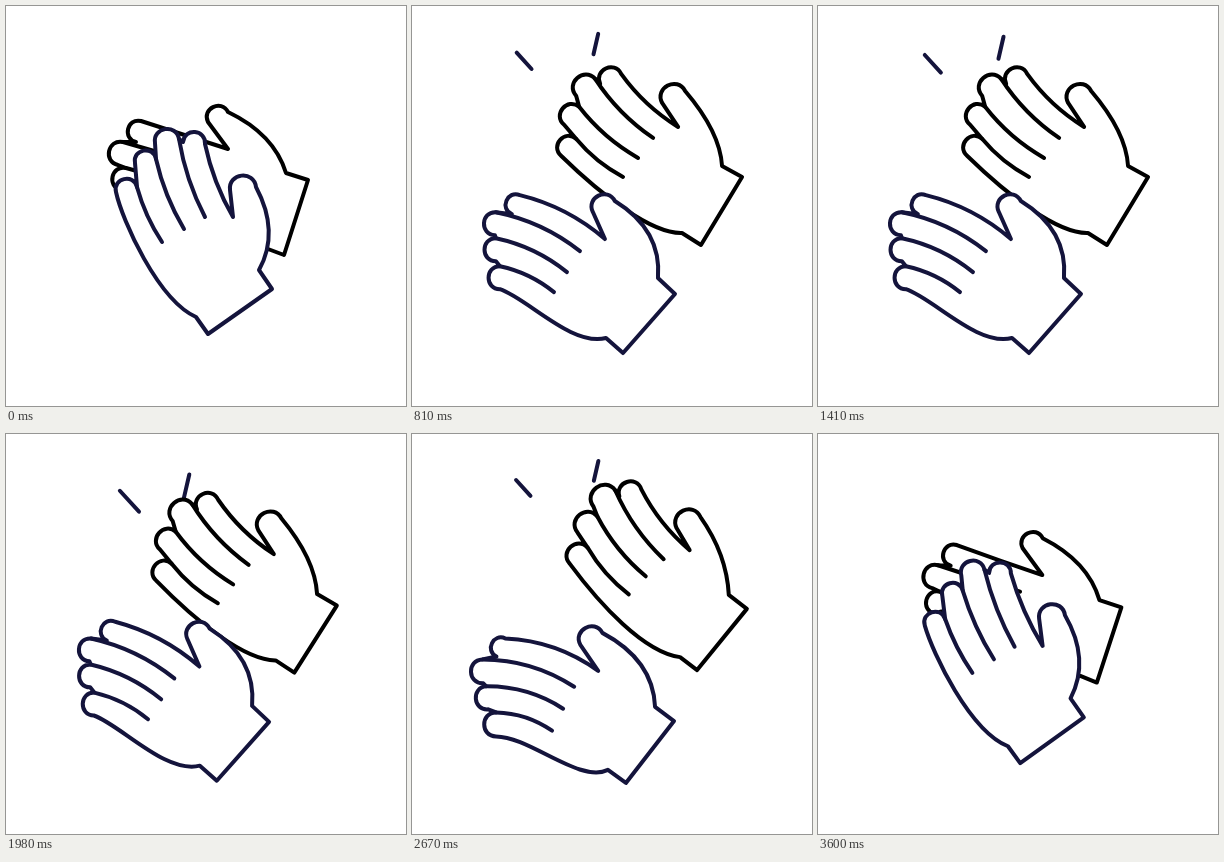
An HTML page with a canvas that plays this animation: 400 px wide and 400 px high, repeating every 3630 ms.

```html
<!DOCTYPE html>
<html lang="en">
<head>
<meta charset="utf-8">
<title>Clapping hands</title>
<style>
html, body { margin: 0; width: 100%; height: 100%; overflow: hidden; background: #fff; }
canvas { display: block; width: 100vmin; height: 100vmin; }
</style>
</head>
<body>
<canvas id="stage" width="400" height="400"></canvas>
<script>
const ctx = document.getElementById('stage').getContext('2d');
const STEP = 30, STEPS = 121;
const NAVY = '#14143c';

// Pose points: pinky, ring and middle as (start, end, crease), index (start, end),
// thumb crotch, thumb (start, end), side control, four wrist corners, heel controls.
const pose = text => text.trim().split(/\s+/).map(p => p.split(',').map(Number));

const back = {
  color: '#000', pivot: [290, 212], bends: [0, -.1, -.1],
  starts: [1, 21, 41, 59.8, 81, 101, 121],
  poses: [
    pose(`122,200 126,181 172,200  115,184 120,162 185,180  112,159 117,136 200,160
      130,136 135,115 222,143  202,116 222,106  268,128
      280,167 302,174 278,249 262,243  230,245 150,215`),
    pose(`149,150 164,133 211,171  152,119 167,101 226,152  164,90 183,73 241,132
      188,78 209,68 266,121  250,97 273,85  308,126
      310,160 330,171 289,239 270,227  240,228 190,190`),
    pose(`158,129 176,113 217,160  166,98 186,82 234,142  182,72 204,56 252,125
      208,62 230,55 278,116  265,94 289,83  315,120
      317,161 335,175 285,236 268,223  232,218 188,170`)
  ]
};

const front = {
  color: NAVY, pivot: [235, 310], bends: [-.08, .12, .15],
  starts: [1, 21, 41, 60.1, 81, 101, 121],
  poses: [
    pose(`110,186 131,181 156,236  129,157 150,153 178,223  149,137 173,133 199,211
      177,136 199,138 227,211  224,184 250,181  274,226
      253,264 266,283 202,328 190,311  152,294 116,214`),
    pose(`88,283 88,260 142,286  84,255 84,232 155,266  83,229 84,206 168,245
      100,208 108,189 193,233  181,206 203,195  250,224
      246,272 263,288 211,347 194,332  160,341 115,292`),
    pose(`84,303 84,279 140,297  76,276 74,253 151,275  71,250 70,226 162,253
      84,223 93,205 186,237  168,211 190,199  241,226
      243,273 262,287 214,349 196,336  168,350 118,303`)
  ]
};

const mix = (a, b, t) => a + (b - a) * t;
const ease = t => (1 - Math.cos(Math.PI * t)) / 2;

// Moves a point along an arc around the pivot.
function swing(a, b, [px, py], t) {
  const ax = a[0] - px, ay = a[1] - py, bx = b[0] - px, by = b[1] - py;
  const turn = Math.atan2(ax * by - ay * bx, ax * bx + ay * by) * t;
  const ra = Math.hypot(ax, ay), scale = mix(ra, Math.hypot(bx, by), t) / ra;
  const c = Math.cos(turn) * scale, s = Math.sin(turn) * scale;
  return [px + ax * c - ay * s, py + ax * s + ay * c];
}

// 0 = palms together, 1 = wide open.
function openness(frame, starts) {
  const i = starts.findLastIndex(s => s <= frame);
  if (i < 0 || i === starts.length - 1) return 0;
  const opening = 8.4, t = frame - starts[i], length = starts[i + 1] - starts[i];
  return t < opening ? ease(t / opening) : ease(((length - t) / (length - opening)) ** .8);
}

function cap(a, b) {
  const dx = (b[1] - a[1]) * .66, dy = (a[0] - b[0]) * .66;
  ctx.lineTo(...a);
  ctx.bezierCurveTo(a[0] + dx, a[1] + dy, b[0] + dx, b[1] + dy, ...b);
}

function bow(a, b, bend) {
  ctx.quadraticCurveTo((a[0] + b[0]) / 2 + (b[1] - a[1]) * bend,
    (a[1] + b[1]) / 2 - (b[0] - a[0]) * bend, ...b);
}

function drawHand(hand, frame) {
  const s = openness(frame, hand.starts), middle = .81;
  const k = s < middle ? 0 : 1;
  const t = k ? (s - middle) / (1 - middle) : s / middle;
  const p = hand.poses[k].map((a, i) => swing(a, hand.poses[k + 1][i], hand.pivot, t));
  const bend = mix(hand.bends[k], hand.bends[k + 1], t);

  ctx.strokeStyle = hand.color;
  ctx.beginPath();
  ctx.moveTo(...p[0]);
  for (const i of [0, 3, 6, 9]) cap(p[i], p[i + 1]);
  bow(p[10], p[11], bend);
  cap(p[12], p[13]);
  ctx.quadraticCurveTo(...p[14], ...p[15]);
  for (const i of [16, 17, 18]) ctx.lineTo(...p[i]);
  ctx.bezierCurveTo(...p[19], ...p[20], ...p[0]);
  ctx.closePath();
  ctx.fill();
  ctx.stroke();

  ctx.beginPath();
  for (const i of [1, 4, 7]) {
    ctx.moveTo(...p[i]);
    bow(p[i], p[i + 1], bend);
  }
  ctx.stroke();
}

// Two dashes shoot outward after each clap and shrink away.
function drawDashes(frame) {
  const u = frame % 20.6;
  if (u < 1.2 || u > 13.6) return;
  const outer = 20 + .608 * Math.max(0, 10 - u) ** 2;
  const inner = Math.min(85, 20 + .476 * (14.1 - u) ** 2);
  const left = d => [115 + (d - 42) * .73, 58 + (d - 42) * .8];
  const right = d => [188 - (d - 20) * .23, d];
  ctx.strokeStyle = NAVY;
  ctx.beginPath();
  for (const at of [left, right]) {
    ctx.moveTo(...at(outer));
    ctx.lineTo(...at(inner));
  }
  ctx.stroke();
}

function draw() {
  const frame = Math.floor(performance.now() / STEP) % STEPS;
  ctx.fillStyle = '#fff';
  ctx.fillRect(0, 0, 400, 400);
  ctx.lineWidth = 4;
  ctx.lineCap = ctx.lineJoin = 'round';
  drawDashes(frame);
  drawHand(back, frame);
  drawHand(front, frame);
  requestAnimationFrame(draw);
}
draw();
</script>
</body>
</html>
```
